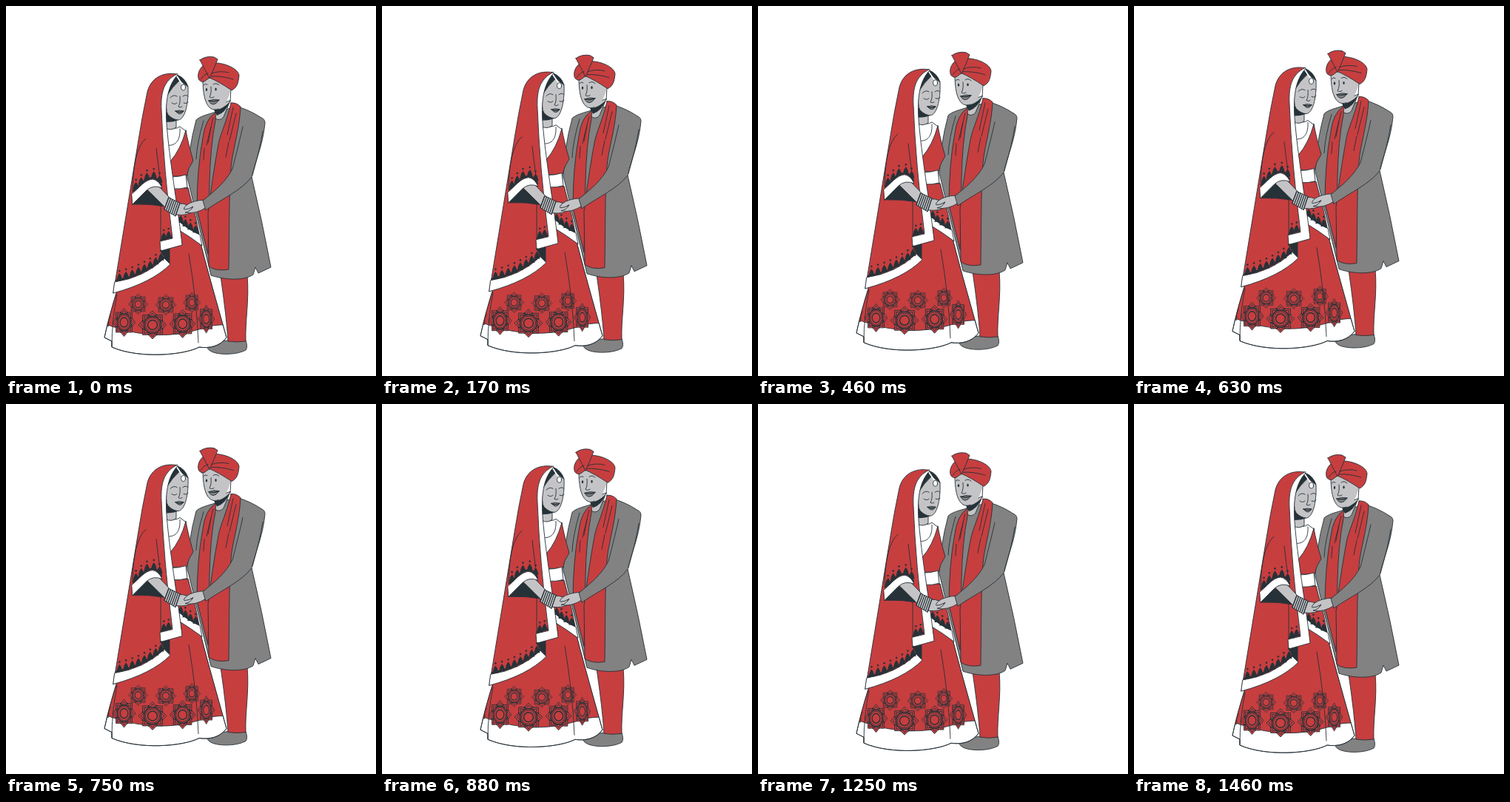
Recreate the animation shown at these times as an HTML page. Size 500 by 500 pixels, loop 1.5 s.

```html
<!DOCTYPE html>
<html lang="en">
<head>
<meta charset="utf-8">
<title>Wedding couple</title>
<style>
html, body { margin: 0; width: 100%; height: 100%; overflow: hidden; background: #fff; }
svg { display: block; width: 100vw; height: 100vh; stroke: #263238; stroke-width: .9; stroke-linecap: round; stroke-linejoin: round; fill: none; }
.red { fill: #c73e3f; }
.grey { fill: #828282; }
.skin { fill: #c4c4c6; }
.white { fill: #fff; }
.dark { fill: #263238; }
.flat { stroke: none; }
.lip { stroke-width: 1.3; }
</style>
</head>
<body>
<svg viewBox="0 0 500 500">
<defs>
  <path id="skirt" d="M226 246H246C254 290 270 350 298 448C289 460 275 463 261 461C240 472 180 477 143 461L143 453 133 448Q139 420 150 385Z"/>
  <clipPath id="inSkirt"><use href="#skirt"/></clipPath>
  <g id="flower"></g>
  <g id="drop" class="dark flat"><path d="M0-9Q3-5 3-3L4 1H-4L-3-3Q-3-5 0-9Z"/><circle cy="-12" r="1.3"/></g>
</defs>
<g id="couple">
  <g id="groom">
    <path class="grey" d="M272 461Q282 454 299 452H324Q327 461 324 465C313 471 292 472 280 468Q272 465 272 461Z"/>
    <path class="red" d="M290 365Q298 420 300 453Q312 455 324 453C323 425 329 398 326 364Z"/>
    <path class="grey" d="M284 143C271 147 262 149 257 154Q246 195 245 232L277 364C295 370 321 372 334 363L337 353 341 361 358 353Q346 290 332 231C336 211 347 190 350 158Q350 153 345 151Q330 141 313 136Z"/>
    <path d="M267 155Q258 185 257 207M347 169Q344 190 333 229"/>
    <!-- head -->
    <path class="skin" d="M282 136L283 152Q289 156 294 150L303 128Z"/>
    <path class="dark flat" d="M281 140Q291 141 302 130Q297 144 285 148Z"/>
    <path class="skin flat" d="M266 99C266 110 267 121 270 129C274 139 280 142 287 139Q299 135 304 112L290 95Z"/>
    <path d="M266 99C266 110 267 121 270 129C274 139 280 142 287 139M304 112L303 129M267 107Q269 104 272 106M280 106Q284 103 288 107M277 109Q278 118 275 123Q277 125 281 123"/>
    <g class="dark flat"><ellipse cx="271" cy="113" rx="1.2" ry="2"/><ellipse cx="283.5" cy="112.5" rx="1.2" ry="2"/></g>
    <path class="grey" d="M274 128Q281 125 288 127Q284 133 280 133Q276 133 274 128Z"/>
    <path class="lip" d="M274 128Q281 130 288 127"/>
    <path class="red" d="M266 81C260 86 258 95 261 100Q265 104 268 102L275 97Q287 102 305 114C313 110 314 103 315 94C314 85 298 78 285 77Z"/>
    <path class="red" d="M262 73Q270 67 281 69L286 72Q281 85 275 98Q269 86 262 73Z"/>
    <path d="M263 99Q268 92 273 91M278 91Q289 87 301 90M277 95Q290 94 307 99"/>
    <!-- scarf -->
    <path class="red" d="M283 144Q269 153 266 178Q258 220 258 275L273 335 275 240Q276 190 283 155Z"/>
    <path class="red" d="M304 131Q311 130 317 136C316 162 308 190 305 210C301 245 302 300 301 356Q285 359 274 352L273 280Q279 230 287 187C290 171 299 155 304 131Z"/>
    <path d="M280 151L271 188M277 164L273 185M268 192L267 208M307 137L299 174M311 145L302 182M301 184L297 204"/>
  </g>
  <g id="bride">
    <use href="#skirt" class="white"/>
    <g clip-path="url(#inSkirt)">
      <path class="red" d="M224 244H246L300 431Q277 430 261 437Q205 454 143 433L136 430 150 385Z"/>
      <g id="flowers"></g>
    </g>
    <use href="#skirt"/>
    <path d="M143 460Q143 425 150 390M247 335Q258 400 260 455"/>
    <!-- bodice and sash -->
    <path class="white" d="M217 163Q228 168 235 163L243 169 244 247H223Z"/>
    <path class="red" d="M243 168Q246 185 253 209Q246 219 244 230H224L222 210Q236 194 243 168Z"/>
    <path class="red" d="M225 247L246 246Q257 283 264 323L234 300Z"/>
    <path d="M217 188C228 190 236 183 235 166"/>
    <path class="white" d="M223 231Q234 231 243 228L245 245Q235 248 225 247Z"/>
    <path class="white" d="M232 289Q248 303 262 309L265 324Q249 312 234 303Z"/>
    <g id="sash"></g>
    <!-- head -->
    <path class="skin" d="M216 145V165Q223 169 230 164V153Z"/>
    <path class="dark flat" d="M216 143L233 154Q227 157 216 157Z"/>
    <path class="skin" d="M217 118Q215 141 219 147Q226 154 233 154C241 153 247 135 246 109L234 95Z"/>
    <path class="dark" d="M217 122Q218 104 231 93Q242 97 246 109Q240 105 235 100Q224 110 217 122Z"/>
    <path d="M231 95L239 107" stroke="#fff" stroke-width="1.7"/>
    <ellipse class="white" cx="239.5" cy="110" rx="3" ry="4"/>
    <path d="M222 124Q226 119 231 122M239 122Q243 119 246 122M224 131Q228 134 231 131M240 131Q243 133 246 130M235 122Q236 131 233 136Q235 138 238 136"/>
    <path class="grey" d="M229 142Q234 140 240 142Q235 150 229 142Z"/>
    <path class="lip" d="M229 142Q235 145 240 142"/>
    <!-- veil -->
    <path class="dark" d="M209 329L221 326V349L206 345Z"/>
    <path class="red" d="M231 92C212 89 196 97 191 116Q184 149 179 181L145 388 205 361 215 341 209 331 227 314 217 225 210 130Q213 104 231 92Z"/>
    <path class="white" d="M147 373Q187 367 214 341L222 349Q197 374 145 388Z"/>
    <path class="white" d="M231 92C213 101 209 117 210 140Q213 220 225 314L208 318 209 331 238 323C234 285 222 215 218 170C215 140 215 111 232 93Z"/>
    <path d="M189 179Q172 193 171 250M203 192L209 241V318"/>
    <g id="trim"></g>
    <!-- arm -->
    <path class="dark" d="M171 268L189 249 219 262 216 271Q193 267 171 268Z"/>
    <path class="skin" d="M190 247L202 239 222 260 234 267Q245 266 254 276Q248 284 229 282L214 271Z"/>
    <path class="white" d="M170 254C180 246 187 235 198 234Q206 235 211 246Q199 241 190 249L171 268Z"/>
    <path class="skin" d="M220 259L235 266 229 284 214 275Z"/>
    <g id="bangles" stroke-width="1.2"></g>
  </g>
  <g id="groomArm">
    <path class="skin" d="M268 262Q252 263 244 269Q239 274 241 275Q247 275 253 271Q249 278 242 279Q256 282 271 272Z"/>
    <path class="grey" d="M320 163Q315 185 306 220C297 238 282 250 266 263L270 276C291 261 319 249 332 231"/>
  </g>
</g>
</svg>
<script>
const $ = id => document.getElementById(id);
const repeat = (n, draw) => Array.from({ length: n }, (_, i) => draw(i)).join('');

// Rosette: eight pointed petals around two rings
$('flower').innerHTML = repeat(8, i => `<g transform="rotate(${i * 45})">
    <path class="red" d="M-6-11L-4-15 0-19 4-15 6-11Z"/>
    <path d="M-4-11L0-16 4-11"/>
    <circle class="dark flat" cx="5.5" cy="-13" r="1.4"/>
  </g>`) + '<circle class="red" r="11.5" stroke-width="1.6"/><circle r="9.5"/><circle class="red" r="6.5" stroke-width="1.5"/>';

// Flowers turn away around the skirt as on a cylinder
const flowerRow = (n, first, step, y, size) => repeat(n, i => {
  const a = first + i * step;
  return `<use href="#flower" transform="translate(${206 + 80 * Math.sin(a)} ${y - 9 * a * a}) scale(${size * Math.cos(a)} ${size})"/>`;
});
$('flowers').innerHTML = flowerRow(3, -.35, .475, 404, .74) + flowerRow(5, -1.14, .52, 431, 1);

// Dark edge with drops standing evenly along it
function addBorder(id, d, n) {
  const edge = document.createElementNS('http://www.w3.org/2000/svg', 'path');
  edge.setAttribute('d', d);
  edge.setAttribute('stroke-width', 2.5);
  $(id).append(edge);
  const len = edge.getTotalLength();
  $(id).insertAdjacentHTML('beforeend', repeat(n, i => {
    const { x, y } = edge.getPointAtLength(len * (i + .5) / n);
    return `<use href="#drop" transform="translate(${x} ${y})"/>`;
  }));
}
addBorder('trim', 'M149 371Q185 364 213 340', 8);
addBorder('trim', 'M172 250C184 240 188 233 198 232Q206 233 210 242', 5);
addBorder('trim', 'M210 316L223 312', 2);
addBorder('sash', 'M233 289Q246 301 260 307', 4);

$('bangles').innerHTML = repeat(7, i => `<path d="M${220 + i * 2.5} ${259 + i * 1.17}l-6 ${16 + i * .3}"/>`);

// Linear float: up by RISE and back
const LOOP = 1500, RISE = 10, LEAD = 21;
function tick() {
  const p = (performance.now() + LEAD) % LOOP / LOOP;
  const y = .28 - RISE * (1 - Math.abs(1 - 2 * p));
  $('couple').setAttribute('transform', `translate(0 ${y.toFixed(3)})`);
  requestAnimationFrame(tick);
}
tick();
</script>
</body>
</html>
```
